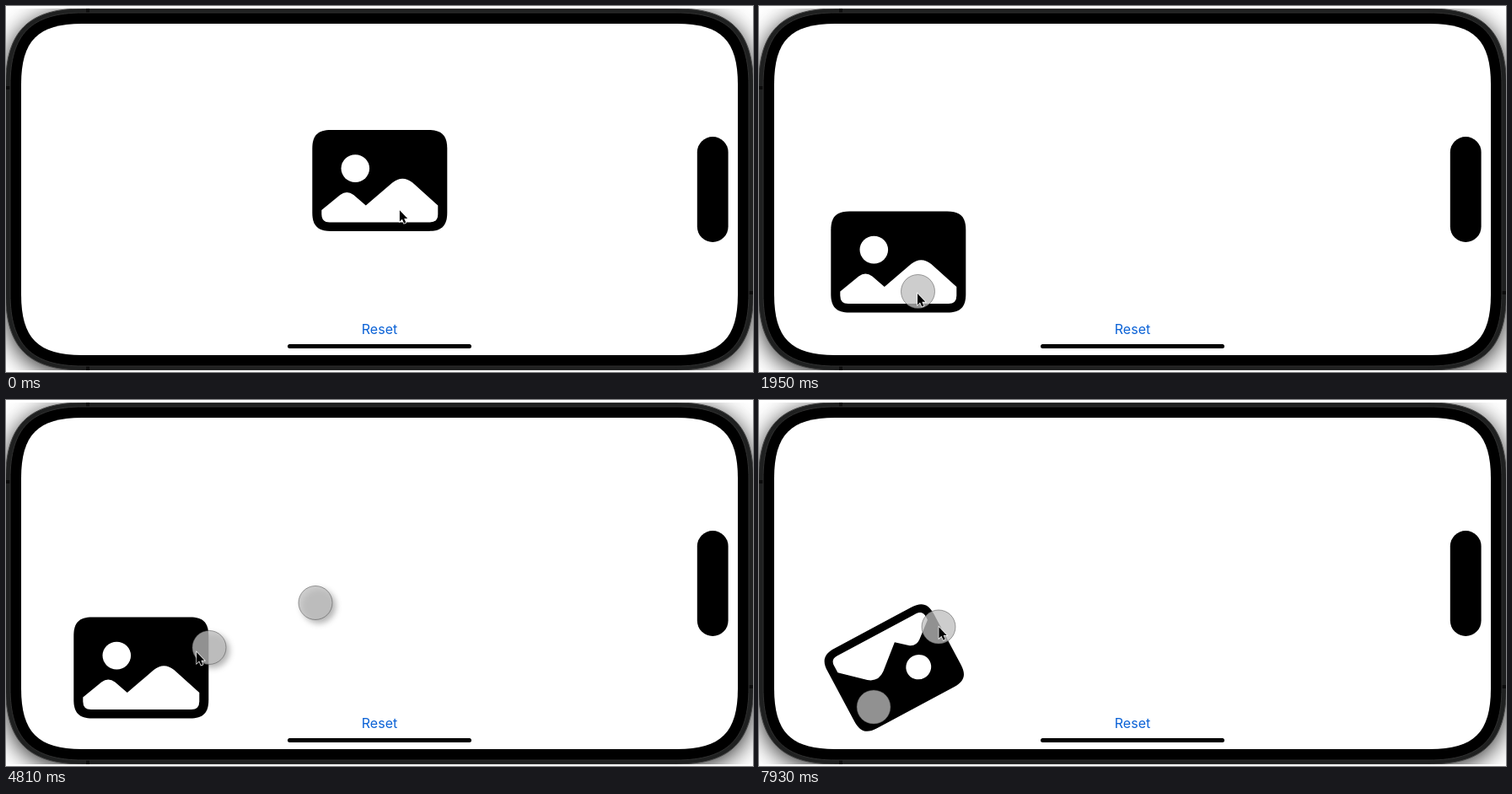
Write an HTML page that moves like this. It is 886x434 px and loops after 8 s.

```html
<!DOCTYPE html>
<html>
<head>
<meta charset="utf-8">
<style>
  html, body { margin: 0; width: 100%; height: 100%; overflow: hidden; background: #fff; }
  svg { display: block; }
  text { font: 16px Inter, "Liberation Sans", sans-serif; fill: #0b62d6; text-anchor: middle; }
  .touch { fill: rgba(190, 190, 190, .765); stroke: rgba(70, 70, 70, .5); stroke-width: 1; }
  .hover { filter: drop-shadow(4px 4px 3.5px rgba(0, 0, 0, .38)); }
</style>
</head>
<body>
<svg width="886" height="434" viewBox="0 0 886 434">
  <defs>
    <filter id="blur" x="-10%" y="-20%" width="120%" height="140%"><feGaussianBlur stdDeviation="14"/></filter>
    <clipPath id="stage"><rect y="3" width="886" height="429"/></clipPath>
    <clipPath id="screenClip"><path class="screen"/></clipPath>
  </defs>
  <g clip-path="url(#stage)">
    <path class="body" opacity=".85" filter="url(#blur)" transform="translate(0 5)"/>
    <path class="body" fill="#1f2020" stroke="#454545"/>
    <path d="M97 3v5M97 427v5M0 97h5M881 340h5" stroke="#0c0c0c" stroke-width="4"/>
    <path class="ring" stroke="#303030"/>
  </g>
  <path class="screen" fill="#fff"/>
  <g clip-path="url(#screenClip)">
    <g id="photo">
      <path class="card"/>
      <ellipse cx="-29" cy="-14.4" rx="16.8" ry="16.3" fill="#fff"/>
      <path fill="#fff" d="M-69 35L-47 17Q-39 11 -31 17L-16.5 29.5L15 2.5Q27 -7 39 2.5L69 29.5V40Q69 49.5 59.5 49.5H-59.5Q-69 49.5 -69 40Z"/>
    </g>
  </g>
  <rect x="819.8" y="155" width="36.8" height="125" rx="18.4"/>
  <rect x="334" y="401" width="218" height="5" rx="2.5"/>
  <text x="443" y="389">Reset</text>
  <circle class="touch" r="20"/>
  <circle class="touch" r="20"/>
  <path id="cursor" d="M0 0V13.3L3 10.5L5.2 15.5L7.4 14.5L5.3 9.7H9.3Z" stroke="#fff" stroke-width="1.4" paint-order="stroke"/>
</svg>
<script>
  const STEP = 130, LOOP = 8000;
  const $ = s => document.querySelector(s);

  // Rectangle with continuous corners: e = corner extent, k = handle distance from the corner
  function squircle(x, y, w, h, e, k) {
    const r = x + w, b = y + h;
    return `M${x + e} ${y}H${r - e}C${r - k} ${y} ${r} ${y + k} ${r} ${y + e}` +
      `V${b - e}C${r} ${b - k} ${r - k} ${b} ${r - e} ${b}` +
      `H${x + e}C${x + k} ${b} ${x} ${b - k} ${x} ${b - e}` +
      `V${y + e}C${x} ${y + k} ${x + k} ${y} ${x + e} ${y}Z`;
  }
  const shapes = {
    body: squircle(-.5, 3, 887, 429, 92, 27),
    ring: squircle(5, 8, 876, 419, 86, 25),
    screen: squircle(18, 21, 850, 393, 72, 20),
    card: squircle(-80, -60, 160, 120, 22, 6.5)
  };
  for (const name in shapes)
    document.querySelectorAll('.' + name).forEach(p => p.setAttribute('d', shapes[name]));

  // Key points of the pointer: step, x, y
  const keys = [
    // drag
    [5, 466.5, 242], [8, 450.5, 149], [10, 400, 124], [11, 341, 151],
    [13, 225, 290], [15, 188.5, 338.5], [18, 183.5, 352.5],
    // bring the fingers together
    [26, 183.5, 352.5], [30, 373.5, 252.5], [33, 380, 244],
    // carry both to the photo
    [36, 285, 278], [40, 123, 336], [43, 111.5, 343],
    // turn and scale
    [47, 111.5, 343], [50, 100, 311], [53, 99.5, 270.5],
    [56, 124, 229], [59, 193, 247], [61, 213, 269]
  ];

  // Smooth curve through the keys that never overshoots them
  const slope = (i, j) => i < 0 || i > keys.length - 2 ? 0
    : (keys[i + 1][j] - keys[i][j]) / (keys[i + 1][0] - keys[i][0]);
  function tangent(i, j) {
    const a = slope(i - 1, j), b = slope(i, j);
    return a * b > 0 ? 2 * a * b / (a + b) : 0;
  }
  function pointAt(s) {
    const next = keys.findIndex(k => k[0] > s);
    if (next === 0) return keys[0].slice(1);
    if (next < 0) return keys[keys.length - 1].slice(1);
    const i = next - 1, a = keys[i], b = keys[next], d = b[0] - a[0];
    const u = (s - a[0]) / d, v = 1 - u;
    return [1, 2].map(j =>
      v * v * ((1 + 2 * u) * a[j] + u * d * tangent(i, j)) +
      u * u * ((1 + 2 * v) * b[j] - v * d * tangent(next, j)));
  }

  const photo = $('#photo'), cursor = $('#cursor');
  const touches = document.querySelectorAll('.touch');
  const move = (el, x, y, more = '') => el.setAttribute('transform', `translate(${x} ${y})${more}`);

  function draw(t) {
    const s = Math.floor(t / STEP), [x, y] = pointAt(s);

    // Second finger: mirrored, then carried along, then mirrored again
    const second = s <= 33 ? [886 - x, 435 - y]
      : s < 46 ? [x + 126, y - 53]
      : [349 - x, 633 - y];
    const two = s >= 25, pressed = s >= 46;
    move(touches[0], x, y);
    move(touches[1], ...second);
    touches[0].style.opacity = two || s >= 5 && s < 19 ? 1 : s === 19 ? .5 : 0;
    touches[1].style.opacity = two ? 1 : 0;
    touches.forEach(c => c.classList.toggle('hover', two && !pressed));

    // One finger drags, two fingers turn and scale about the centre
    const [px, py] = pointAt(Math.min(s, 20));
    const dx = second[0] - x, dy = second[1] - y;
    const turn = pressed ? (Math.atan2(dy, dx) - Math.atan2(-53, 126)) * 180 / Math.PI : 0;
    const scale = pressed ? Math.hypot(dx, dy) / Math.hypot(126, 53) : 1;
    move(photo, px - 23.2, py - 35, ` rotate(${turn}) scale(${scale})`);

    // The arrow runs slightly ahead of the touch
    const [cx, cy] = pointAt(s + .3);
    move(cursor, cx + .4, cy + .3);
    cursor.style.opacity = s >= 23 && s < 25 ? 0 : 1;
  }

  const start = performance.now();
  function tick() {
    draw((performance.now() - start) % LOOP);
    requestAnimationFrame(tick);
  }
  tick();
</script>
</body>
</html>
```
